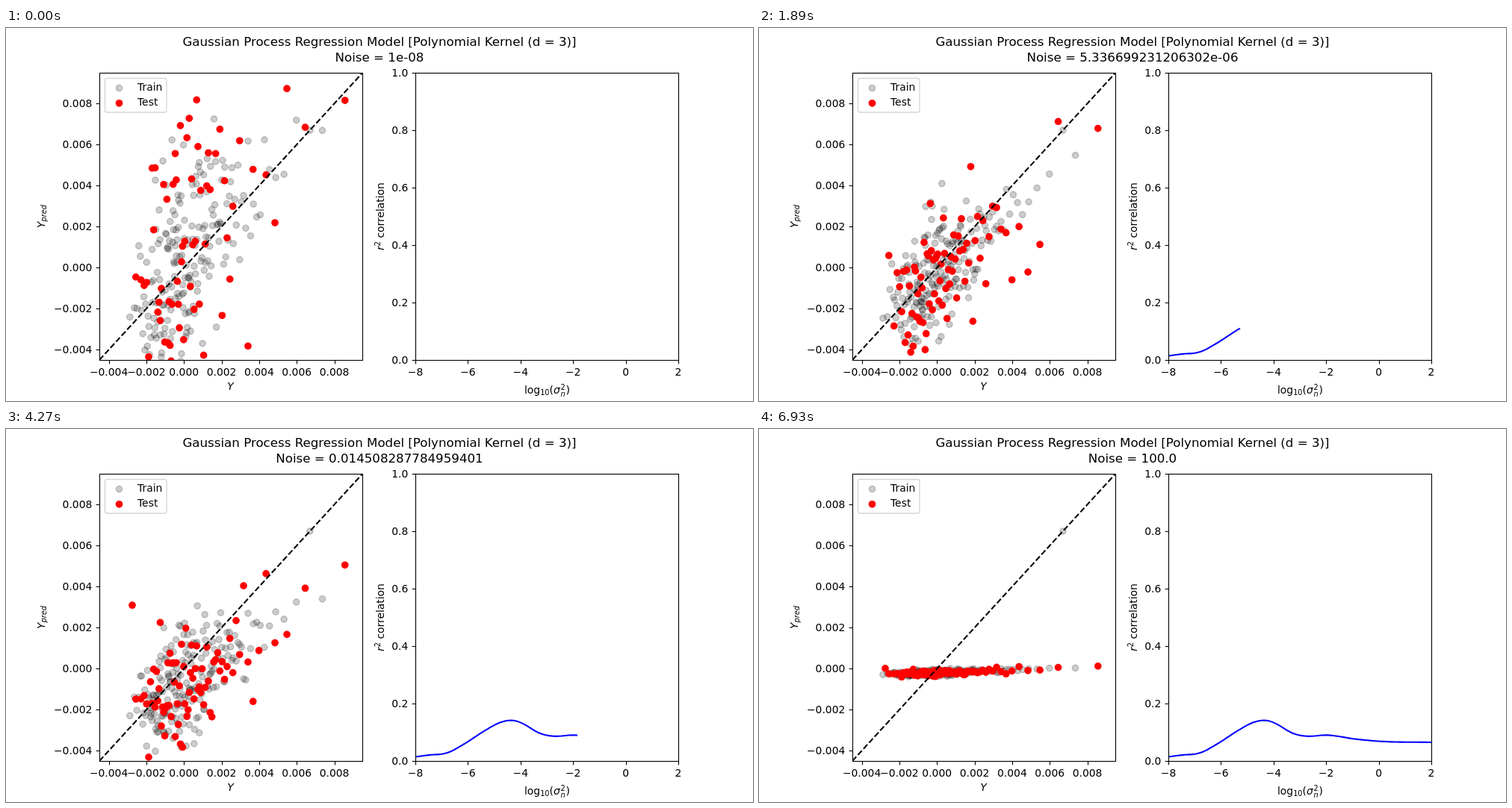
An HTML page for the animation above (7000 ms loop, 1000 px wide and 500 px high).

```html
<!DOCTYPE html>
<html lang="en">
<head>
<meta charset="utf-8">
<title>Gaussian Process Regression</title>
<style>
  html, body { margin: 0; width: 100%; height: 100%; overflow: hidden; background: #fff; }
  svg { display: block; width: 1000px; height: 500px; font: 13.89px "DejaVu Sans", sans-serif; }
  .title { font-size: 16.67px; }
  .mid { text-anchor: middle; }
  .end { text-anchor: end; }
  .it { font-style: italic; }
  .sub { font-size: 9.72px; }
  .axis { fill: none; stroke: #000; stroke-width: 1.11; }
  .train { fill: #000; stroke: #000; stroke-width: 1.39; fill-opacity: .2; stroke-opacity: .2; }
  .test { fill: red; stroke: red; stroke-width: 1.39; }
</style>
</head>
<body>
<svg id="stage" viewBox="0 0 1000 500"></svg>
<script>
const FRAMES = 100, STEP = 70, FLAT = 326, R = 4.17;
const TOP = 60, BOTTOM = 445, L1 = 125, R1 = 477.3, L2 = 548, R2 = 900;

// Shape of the cloud along the sweep: trend line and spread of each group
const poses = [
  { k: 0, base: 321, slope: 1.09, train: 76, test: 165 },
  { k: 17, base: 322, slope: 0.85, train: 66, test: 82 },
  { k: 37, base: 328, slope: 0.75, train: 52, test: 56 },
  { k: 55, base: 336, slope: 0.65, train: 42, test: 50 }
];

// Key points of the correlation curve
const curve = [
  [548, 439.5], [565, 437.2], [590, 434.3], [612, 423], [640, 405],
  [660, 394], [676, 390.5], [690, 394], [715, 408], [735, 411.8],
  [762, 410.4], [800, 415.8], [840, 419.1], [900, 420]];

const mix = (a, b, p) => a + (b - a) * p;

let seed = 8153;
function rand() {
  seed = (seed + 0x6D2B79F5) | 0;
  let t = Math.imul(seed ^ seed >>> 15, 1 | seed);
  t = t + Math.imul(t ^ t >>> 7, 61 | t) ^ t;
  return ((t ^ t >>> 14) >>> 0) / 4294967296;
}
const gauss = () => (rand() + rand() + rand() + rand() - 2) * 1.73;

// Normal quantile, evenly spread over a group
const normal = u => 4.91 * (u ** 0.14 - (1 - u) ** 0.14);

function makeGroup(n, kind, left, scale, skew) {
  return Array.from({ length: n }, (_, i) => {
    const x = left + scale * Math.exp(skew * normal((i + 0.5) / n));
    const trend = kind === "test" ? 0.7 : 1;
    const taper = kind === "test" ? 1 : 0.4 + 0.6 * Math.exp(-(((x - 235) / 80) ** 2));
    const ys = poses.map(p => {
      const y = p.base - p.slope * trend * (x - 240) + p[kind] * taper * gauss();
      return x < 222 && y < 125 ? 250 - y : y; // stay clear of the legend
    });
    return { x, ys, kind };
  });
}

function heightAt(p, k, noise) {
  if (p.fixed) return p.fixed;
  let i = 0;
  while (i < poses.length - 2 && k > poses[i + 1].k) i++;
  const a = poses[i].k, b = poses[i + 1].k;
  const y = mix(p.ys[i], p.ys[i + 1], Math.min(1, (k - a) / (b - a)));
  return FLAT + (y - FLAT) / (1 + noise / 6);
}

function curveAt(x) {
  let i = 0;
  while (i < curve.length - 2 && x > curve[i + 1][0]) i++;
  const slope = j => {
    const a = curve[Math.max(0, j - 1)], b = curve[Math.min(curve.length - 1, j + 1)];
    return (b[1] - a[1]) / (b[0] - a[0]);
  };
  const [x0, y0] = curve[i], [x1, y1] = curve[i + 1];
  const w = x1 - x0, t = (x - x0) / w, u = 1 - t;
  return y0 * (1 + 2 * t) * u * u + slope(i) * w * t * u * u
       + y1 * t * t * (3 - 2 * t) - slope(i + 1) * w * t * t * u;
}

function noiseText(v) {
  if (v < 1e-4) return v.toExponential().replace(/e-(\d)$/, "e-0$1");
  return Number.isInteger(v) ? v.toFixed(1) : String(v);
}

const text = (x, y, s, cls = "", more = "") =>
  `<text x="${x}" y="${y}" class="${cls}" ${more}>${s}</text>`;
const label = (v, digits) => v.toFixed(digits).replace("-", "\u2212");
const snap = v => Math.round(v) + 0.5;
const dot = (x, y, cls) => `<circle cx="${x}" cy="${y}" r="${R}" class="${cls}"/>`;

function xTick(x, s) {
  return `<path class="axis" d="M${snap(x)} 445.5v4.9"/>` + text(x, 465.5, s, "mid");
}
function yTick(x, y, s) {
  return `<path class="axis" d="M${snap(x)} ${snap(y)}h-4.9"/>` + text(x - 9.7, y + 5, s, "end");
}
const box = (l, r) =>
  `<rect class="axis" x="${snap(l)}" y="60.5" width="${snap(r) - snap(l)}" height="385"/>`;

function axes() {
  let s = "";
  for (let v = -4; v <= 8; v += 2) {
    const p = (v + 4.5) / 14;
    s += xTick(mix(L1, R1, p), label(v / 1000, 3));
    s += yTick(L1, mix(BOTTOM, TOP, p), label(v / 1000, 3));
  }
  for (let i = 0; i < 6; i++) {
    s += xTick(mix(L2, R2, i / 5), label(i * 2 - 8, 0));
    s += yTick(L2, mix(BOTTOM, TOP, i / 5), label(i / 5, 1));
  }
  return s + box(L1, R1) + box(L2, R2);
}

const small = (s, dy) => `<tspan class="sub" dy="${dy}">${s}</tspan>`;

function labels() {
  return text(500, 24, "Gaussian Process Regression Model [Polynomial Kernel (d = 3)]", "title mid")
    + text(500, 45, "", "title mid", 'id="noise"')
    + text(300.5, 485, "Y", "mid it")
    + text(0, 0, "Y" + small("pred", 2.2), "mid it", 'transform="translate(51.5 252.5) rotate(-90)"')
    + text(0, 0, '<tspan class="it">r</tspan>' + small("2", -5.3) + '<tspan dy="5.3"> correlation</tspan>',
        "mid", 'transform="translate(506 252.5) rotate(-90)"')
    + text(694, 490, "log" + small("10", 2.3) + '<tspan dy="-2.3">(</tspan><tspan class="it">σ</tspan>')
    + text(742.5, 484.5, "2", "sub") + text(742.5, 493.5, "n", "sub it")
    + text(749.5, 490, ")");
}

const legend = `<g id="legend">
  <rect x="132.5" y="67.5" width="82.5" height="45.5" rx="2.8" fill="#fff" fill-opacity=".8"
    stroke="#ccc" stroke-opacity=".8" stroke-width="1.39"/>`
  + dot(151.5, 80.5, "train") + dot(151.5, 100.8, "test")
  + text(176, 84, "Train") + text(176, 104.4, "Test") + "</g>";

// One test point drops in past the legend; one train point never moves
const diver = { x: 169, ys: [-190, -60, 117, 236], kind: "test" };
const pinned = { x: 407, fixed: 137, kind: "train" };
const points = [
  ...makeGroup(195, "train", 120, 118, 0.34), pinned,
  ...makeGroup(76, "test", 140, 103, 0.45), diver
];

const stage = document.getElementById("stage");
stage.innerHTML = `
  <clipPath id="clip"><rect x="125" y="60" width="352.3" height="385"/></clipPath>
  <g id="dots" clip-path="url(#clip)">`
  + points.map(p => dot(p.x.toFixed(2), 0, p.kind)).join("")
  + `<path d="M125 445L477.3 60" stroke="#000" stroke-width="2.08" stroke-dasharray="7.7 3.33"/></g>
  <polyline id="score" fill="none" stroke="#00f" stroke-width="2.08" stroke-linejoin="round"/>`
  + axes() + labels() + legend;

const dots = stage.querySelectorAll("#dots circle");
const [noiseEl, scoreEl, legendEl] = ["noise", "score", "legend"].map(id => document.getElementById(id));
const score = Array.from({ length: FRAMES }, (_, k) => {
  const x = mix(L2, R2, k / 99);
  return `${x.toFixed(2)},${curveAt(x).toFixed(2)}`;
});

function draw(k) {
  const power = k * 10 / 99 - 8;
  const noise = Number.isInteger(power) ? Number("1e" + power) : 10 ** power;
  noiseEl.textContent = "Noise = " + noiseText(noise);
  points.forEach((p, i) => dots[i].setAttribute("cy", heightAt(p, k, noise).toFixed(2)));
  scoreEl.setAttribute("points", k ? score.slice(0, k + 1).join(" ") : "");
  // The legend moves to the lower right while a point lies under it
  const y = heightAt(diver, k, noise);
  legendEl.setAttribute("transform", y > 67 && y < 113 ? "translate(255 325)" : "");
}

let last = -1;
function tick() {
  const k = Math.floor(performance.now() / STEP) % FRAMES;
  if (k !== last) draw(last = k);
  requestAnimationFrame(tick);
}
tick();
</script>
</body>
</html>
```
